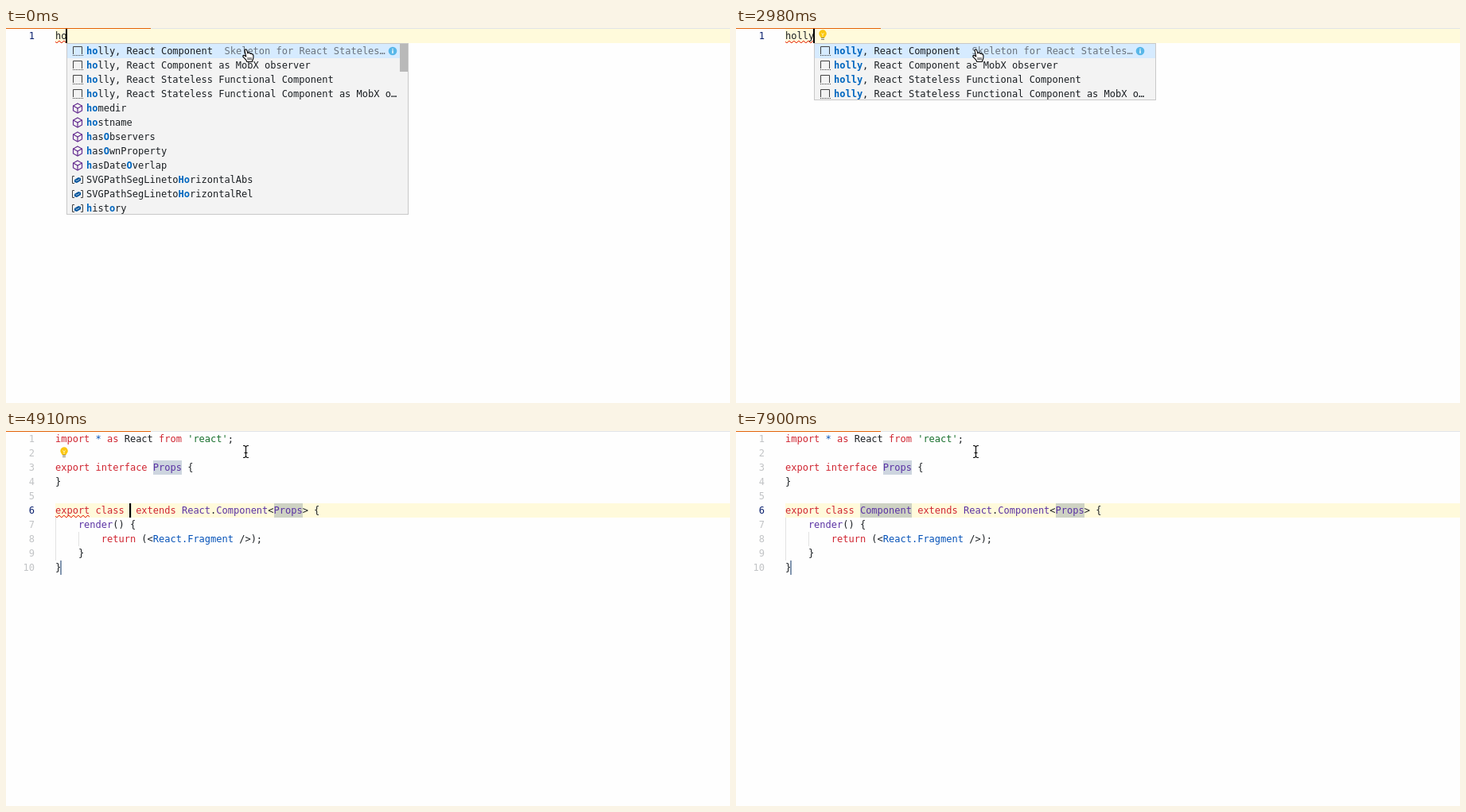
Write an HTML page with a canvas that moves like this. It is 910 by 472 pixels and loops after 8 s.

```html
<!DOCTYPE html>
<html lang="en">
<head>
<meta charset="utf-8">
<title>Snippet completion</title>
<style>
html, body { margin: 0; width: 100%; height: 100%; overflow: hidden; background: #fefefe; }
canvas { display: block; width: 910px; height: 472px; }
</style>
</head>
<body>
<canvas id="stage"></canvas>
<script>
const W = 910, H = 472, LOOP = 8000, LINE = 18, LEFT = 62;
const FONT = '12px "DejaVu Sans Mono", Menlo, monospace';
const INK = '#1b1f23', RED = '#d02531', PURPLE = '#5a32a3', BLUE = '#0552b8', GREEN = '#176f2c';
const STOP = 'rgba(10,50,100,.2)', MARK = '#0066bf', ICON = '#424242';

const canvas = document.getElementById('stage');
const ctx = canvas.getContext('2d');
const dpr = window.devicePixelRatio || 1;
canvas.width = W * dpr;
canvas.height = H * dpr;
ctx.font = FONT;
const PITCH = ctx.measureText('m'.repeat(100)).width / 100;

// [start time, value] steps; the last one reached applies
const typing = [[0, 'ho'], [440, 'hol'], [590, 'holl'], [1030, 'holly']];
const naming = [[0, ''], [5660, 'C'], [6260, 'Co'], [6410, 'Com'], [6710, 'Compo'],
  [7150, 'Compone'], [7300, 'Componen'], [7450, 'Component']];
const blink = [[0, 1], [1480, 0], [2080, 1], [2530, 0], [2980, 1], [4160, 0], [4610, 1],
  [5510, 0], [5660, 1], [6110, 0], [6260, 1], [7900, 0]];
const at = (steps, t) => steps.filter(s => s[0] <= t).pop()[1];

// [icon, label, indexes of matched letters]
const rows = [
  ['snippet', 'holly, React Component'],
  ['snippet', 'holly, React Component as MobX observer'],
  ['snippet', 'holly, React Stateless Functional Component'],
  ['snippet', 'holly, React Stateless Functional Component as MobX o…'],
  ['method', 'homedir', [0, 1]],
  ['method', 'hostname', [0, 1]],
  ['method', 'hasObservers', [0, 3]],
  ['method', 'hasOwnProperty', [0, 3]],
  ['method', 'hasDateOverlap', [0, 7]],
  ['variable', 'SVGPathSegLinetoHorizontalAbs', [16, 17]],
  ['variable', 'SVGPathSegLinetoHorizontalRel', [16, 17]],
  ['variable', 'history', [0, 4]]
];

const colX = n => LEFT + n * PITCH;
const lineY = n => 1 + (n - 1) * LINE;

function box(x, y, w, h, color) {
  ctx.fillStyle = color;
  ctx.fillRect(x, y, w, h);
}

function text(s, x, y, color, bold) {
  ctx.font = (bold ? 'bold ' : '') + FONT;
  ctx.fillStyle = color;
  ctx.fillText(s, x, y);
}

function path(points, close) {
  ctx.beginPath();
  points.forEach(([x, y], i) => i ? ctx.lineTo(x, y) : ctx.moveTo(x, y));
  if (close) ctx.closePath();
}

function stroke(points, color, width, close) {
  path(points, close);
  ctx.strokeStyle = color;
  ctx.lineWidth = width;
  ctx.stroke();
}

function code(line, runs) {
  let col = 0;
  for (const [s, color = INK] of runs) {
    text(s, colX(col), lineY(line) + 13, color);
    col += s.length;
  }
}

function number(n, active) {
  const s = String(n);
  text(s, 36 - s.length * PITCH, lineY(n) + 13, active ? '#0b216f' : '#c2c4c6');
}

function caret(line, col) {
  box(Math.round(colX(col)) - 1, lineY(line), 2, LINE, '#000');
}

function currentLine(n) {
  box(LEFT, lineY(n), W - LEFT, LINE, '#fffadb');
}

function mark(line, col, len, color) {
  const x = Math.round(colX(col));
  if (len) box(x, lineY(line), Math.round(colX(col + len)) - x, LINE, color);
  else box(x, lineY(line), 2, LINE, color);
}

function squiggle(line, len) {
  const y = lineY(line) + 15, end = Math.round(colX(len));
  ctx.save();
  ctx.beginPath();
  ctx.rect(LEFT, y, end - LEFT, 3);
  ctx.clip();
  const points = [];
  for (let x = LEFT - 1.2; x < end + 6; x += 6) points.push([x, y], [x + 3, y + 3]);
  stroke(points, '#e51400', 1);
  ctx.restore();
}

function bulb(x, y) {
  ctx.beginPath();
  ctx.arc(x, y, 4.7, Math.PI * .8, Math.PI * 2.2);
  ctx.lineTo(x + 2.4, y + 5);
  ctx.lineTo(x - 2.4, y + 5);
  ctx.fillStyle = '#fbc712';
  ctx.fill();
  stroke([[x - 1.8, y - .5], [x, y + 1], [x + 1.8, y - .5]], '#fff0b0', 1);
  stroke([[x, y + 1], [x, y + 4]], '#fff0b0', 1);
  box(x - 2, y + 5, 4, 1, '#8b8570');
  box(x - 2, y + 7, 4, 1, '#8b8570');
}

const icons = {
  snippet(x, y) {
    stroke([[x - 5.5, y + 4], [x - 5.5, y - 5.5], [x + 5.5, y - 5.5], [x + 5.5, y + 4]], ICON, 1);
    for (let i = -6; i <= 6; i += 2) box(x + i, y + 5, 1, 1, ICON);
  },
  method(x, y) {
    stroke([[x, y - 6], [x + 5.5, y - 3], [x + 5.5, y + 3], [x, y + 6], [x - 5.5, y + 3], [x - 5.5, y - 3]],
      '#652d90', 1.2, true);
    stroke([[x - 5.5, y - 3], [x, y], [x + 5.5, y - 3]], '#652d90', 1.2);
    stroke([[x, y], [x, y + 6]], '#652d90', 1.2);
  },
  variable(x, y) {
    for (const d of [-1, 1])
      stroke([[x + 4 * d, y - 4.5], [x + 6.5 * d, y - 4.5], [x + 6.5 * d, y + 4.5], [x + 4 * d, y + 4.5]], ICON, 1);
    path([[x - 4, y], [x + 1, y - 3], [x + 4, y - 2], [x + 4, y + 1], [x - 1, y + 4], [x - 4, y + 3]], true);
    ctx.fillStyle = '#00539c';
    ctx.fill();
    stroke([[x - 2.5, y + .8], [x - .8, y + 1.3], [x + 2.5, y - .8]], '#f3f3f3', .8);
  }
};

function popup(typed) {
  const x = Math.round(colX(typed.length)), full = typed !== 'holly';
  const list = full ? rows : rows.slice(0, 4), h = list.length * LINE;
  box(x, 19, 430, h, '#f3f3f3');
  ctx.save();
  ctx.beginPath();
  ctx.rect(x, 19, 430, h);
  ctx.clip();
  box(x + 1, 20, 428, LINE, '#d6ebff');
  list.forEach(([icon, label, hits], i) => {
    const y = 20 + i * LINE;
    icons[icon](x + 14, y + 9);
    [...label].forEach((ch, n) => {
      const hit = hits ? hits.includes(n) : n < typed.length;
      text(ch, x + 25 + n * PITCH, y + 13, hit ? MARK : INK, hit);
    });
  });
  text('Skeleton for React Stateles…', x + 198.5, 33, '#6a737d');
  ctx.beginPath();
  ctx.arc(x + 410, 29, 5.3, 0, 7);
  ctx.fillStyle = '#58b7e8';
  ctx.fill();
  box(x + 409.3, 26, 1.4, 1.3, '#fff');
  box(x + 409.3, 28, 1.4, 4, '#fff');
  if (full) box(x + 419, 20, 10, 35, '#b9b9b9');
  ctx.restore();
  ctx.strokeStyle = '#c8c8c8';
  ctx.lineWidth = 1;
  ctx.strokeRect(x + .5, 19.5, 429, h - 1);
}

function hand() {
  ctx.save();
  ctx.translate(297, 26);
  ctx.lineJoin = 'round';
  path([[3, 2], [4, .8], [5.4, 1.2], [7, 6], [8, 4.8], [9.4, 5.2], [10, 6.4], [11.2, 5.8], [12.2, 7],
    [13.3, 7], [14, 9], [13.8, 12], [12.3, 16.5], [5.8, 16.5], [4.5, 13.8], [.8, 10.2], [1, 8.6],
    [2.6, 8.4], [4.8, 10]], true);
  ctx.fillStyle = '#fff';
  ctx.fill();
  ctx.strokeStyle = '#000';
  ctx.lineWidth = 1.1;
  ctx.stroke();
  for (const x of [7, 9, 11]) stroke([[x, 11], [x + .2, 14.5]], '#000', .8);
  ctx.restore();
}

function beam() {
  const shape = [[[298, 18.5], [300, 18.5], [301.5, 20], [303, 18.5], [305, 18.5]],
    [[301.5, 20], [301.5, 32]],
    [[298, 33.5], [300, 33.5], [301.5, 32], [303, 33.5], [305, 33.5]],
    [[299.5, 27.5], [303.5, 27.5]]];
  for (const s of shape) stroke(s, '#fff', 2.6);
  for (const s of shape) stroke(s, '#111', 1.2);
}

function completion(t) {
  const typed = at(typing, t);
  currentLine(1);
  number(1, true);
  code(1, [[typed]]);
  squiggle(1, t < 1030 ? 2 : 5);
  if (at(blink, t)) caret(1, typed.length);
  if (t >= 1780) bulb(109, 7);
  popup(typed);
  hand();
}

function expanded(t) {
  const name = at(naming, t), onProps = t < 4910, propsCol = 38 + name.length;
  const fill = onProps ? '#81afe0' : STOP;
  if (!onProps) currentLine(6);
  mark(3, 17, 5, fill);
  mark(6, propsCol, 5, fill);
  mark(6, 13, name.length, STOP);
  box(LEFT, lineY(7), 1, 3 * LINE, '#e2e2e2');
  box(Math.round(colX(4)), lineY(8), 1, LINE, '#e2e2e2');
  for (let n = 1; n <= 10; n++) number(n, n === (onProps ? 3 : 6));

  code(1, [['import ', RED], ['* ', BLUE], ['as ', RED], ['React '], ['from ', RED], ["'react'", GREEN], [';']]);
  code(3, [['export interface ', RED], ['Props', PURPLE], [' {']]);
  code(4, [['}']]);
  code(6, [['export class ', RED], [name, PURPLE], [' extends ', RED], ['React', PURPLE], ['.'],
    ['Component', PURPLE], ['<'], ['Props', PURPLE], ['> {']]);
  code(7, [['    render', PURPLE], ['() {']]);
  code(8, [['        return', RED], [' (<'], ['React.Fragment', BLUE], [' />);']]);
  code(9, [['    }']]);
  code(10, [['}']]);
  box(68, lineY(10), 2, LINE, 'rgba(10,50,100,.5)');

  if (t < 4010) squiggle(1, 5);
  else if (t < 6110) squiggle(6, 6);
  if (t < 3870) bulb(109, 7);
  else if (t < 5210) bulb(73, 25);
  if (at(blink, t)) {
    if (onProps) {
      caret(3, 22);
      caret(6, propsCol + 5);
    } else caret(6, 13 + name.length);
  }
  beam();
}

function draw(t) {
  ctx.setTransform(dpr, 0, 0, dpr, 0, 0);
  box(0, 0, W, H, '#fefefe');
  box(0, 0, W, 1, '#e1e4e8');
  box(0, 0, 182, 1, '#e36209');
  if (t < 3570) completion(t);
  else expanded(t);
}

function tick() {
  draw(performance.now() % LOOP);
  requestAnimationFrame(tick);
}
tick();
</script>
</body>
</html>
```
